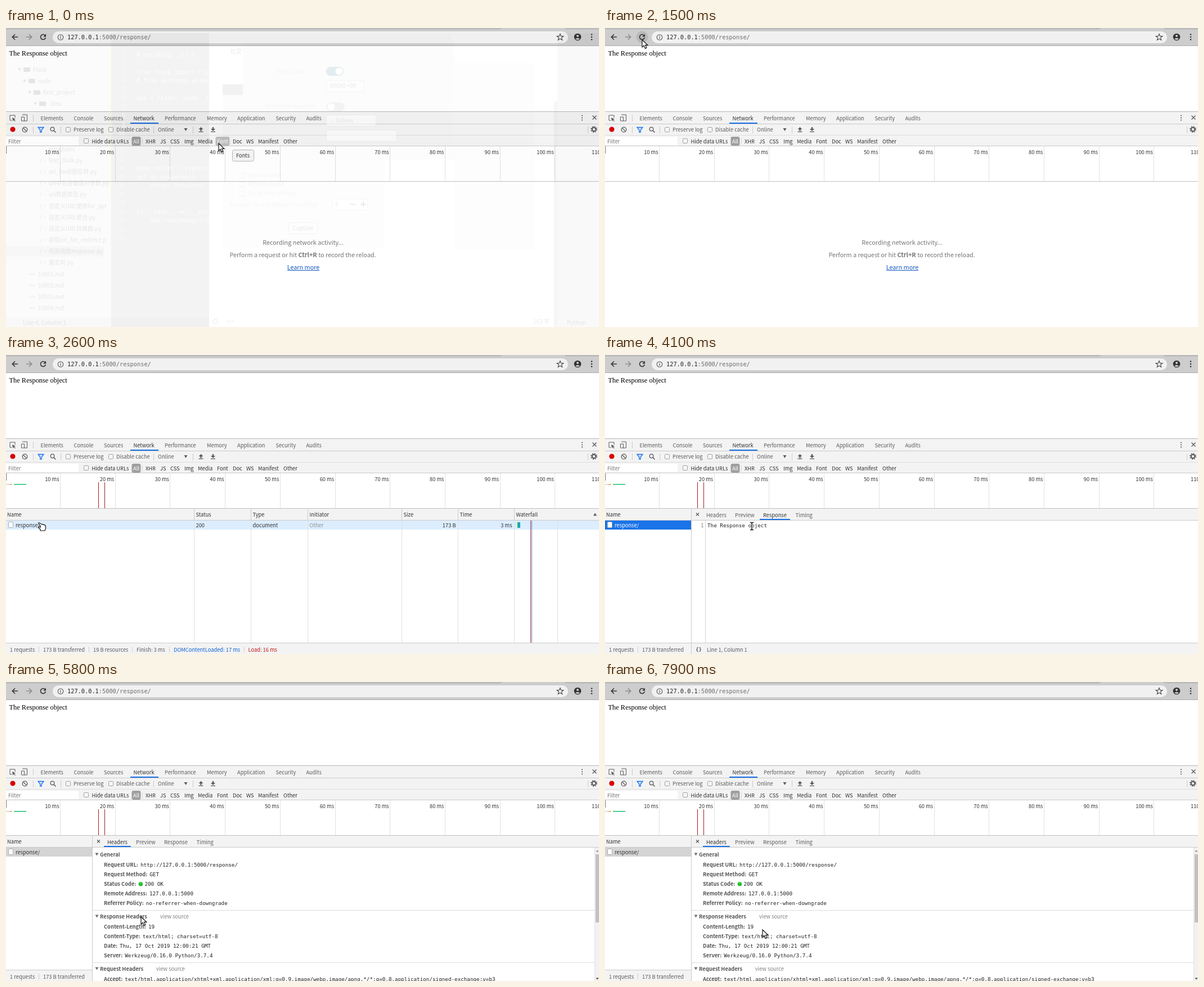
Animation, 1054 px wide and 531 px high, one loop 8 s. Source, as an HTML page with a canvas:

```html
<!DOCTYPE html>
<html lang="en">
<head>
<meta charset="utf-8">
<title>Inspecting a response</title>
<style>
html, body { margin: 0; width: 100%; height: 100%; overflow: hidden; background: #fff; }
canvas { display: block; }
</style>
</head>
<body>
<canvas id="stage" width="1054" height="531"></canvas>
<script>
const ctx = document.getElementById('stage').getContext('2d');
const W = 1054, H = 531, LOOP = 8000, STEP = 100;
const SANS = '"Noto Sans CJK SC", "Noto Sans CJK JP", "Noto Sans CJK", "Open Sans", sans-serif';
const MONO = '"DejaVu Sans Mono", monospace';
const UI = `9.3px ${SANS}`, BOLD = `bold 9.3px ${SANS}`, CODE = `9.27px ${MONO}`;
const GREY = '#5a5a5a', DARK = '#303030', BAR = '#f3f3f3', EDGE = '#cacaca', BLUE = '#1a73e8';

// Draws text on its baseline and returns the x where it ends.
function text(s, x, y, color = DARK, font = UI, align = 'left') {
  ctx.font = font;
  ctx.fillStyle = color;
  ctx.textAlign = align;
  ctx.fillText(s, x, y);
  return x + ctx.measureText(s).width;
}
function rect(x, y, w, h, color) {
  ctx.fillStyle = color;
  ctx.fillRect(x, y, w, h);
}
function round(x, y, w, h, r, fill, stroke) {
  ctx.beginPath();
  ctx.roundRect(x, y, w, h, r);
  paint(fill, stroke);
}
function circle(x, y, r, fill, stroke, width) {
  ctx.beginPath();
  ctx.arc(x, y, r, 0, 7);
  paint(fill, stroke, width);
}
function paint(fill, stroke, width = 1) {
  if (fill) { ctx.fillStyle = fill; ctx.fill(); }
  if (stroke) { ctx.strokeStyle = stroke; ctx.lineWidth = width; ctx.stroke(); }
}
// Paints an SVG path moved to x, y.
function shape(d, x, y, fill, stroke, width = 1) {
  const path = new Path2D(d);
  ctx.save();
  ctx.translate(x, y);
  if (fill) { ctx.fillStyle = fill; ctx.fill(path); }
  if (stroke) { ctx.strokeStyle = stroke; ctx.lineWidth = width; ctx.stroke(path); }
  ctx.restore();
}
const hline = (x, y, w, color = EDGE) => rect(x, y, w, 1, color);
const vline = (x, y, h, color = EDGE) => rect(x, y, 1, h, color);
const triangle = (x, y, color = GREY) => shape('M-3-2.5H3L0 2.5Z', x, y, color);
const checkbox = (x, y) => round(x + .5, y + .5, 8, 8, 1, '#f6f6f6', '#a0a0a0');

function browserBar(hoverReload) {
  rect(0, 0, W, 31, '#cdcdcd');
  shape('M0 1.5H876Q880 1.5 881 0M993 0Q994 1.5 998 1.5H1054', 0, 0, null, '#a2a2a2');
  hline(0, 31, W, '#ababab');
  if (hoverReload) circle(66, 16, 10.5, '#b9b9b9');
  const arrow = 'M5 0H-4.5M0-4.7L-4.7 0L0 4.7';
  shape(arrow, 16, 16, null, '#333', 1.6);
  ctx.save();
  ctx.translate(41, 16);
  ctx.scale(-1, 1);
  shape(arrow, 0, 0, null, '#8c8c8c', 1.6);
  ctx.restore();
  shape('M3.2-3.2A4.5 4.5 0 1 0 4.4 1', 66, 16, null, '#333', 1.6);
  shape('M5-5.5V-.6H.2Z', 66, 16, '#333');
  round(83, 6, 916, 21, 10.5, '#f1f1f1');
  circle(97, 16.5, 4.8, null, '#555', 1.1);
  rect(96.4, 15.5, 1.2, 3.6, '#555');
  rect(96.4, 13.5, 1.2, 1.2, '#555');
  const end = text('127.0.0.1', 109, 20, '#222', `10.3px ${MONO}`);
  text(':5000/response/', end, 20, '#6c6c6c', `10.3px ${MONO}`);
  shape('M0-6L1.6-2H5.8L2.5.8 3.7 5 0 2.6-3.7 5-2.5.8-5.8-2H-1.6Z', 985, 16.5, null, '#444', 1.1);
  circle(1016, 16, 6.3, '#333');
  circle(1016, 14, 2, '#cdcdcd');
  shape('M-4 3.2Q0 .2 4 3.2Q0 7 -4 3.2Z', 1016, 16, '#cdcdcd');
  for (const y of [11.5, 16, 20.5]) circle(1041, y, 1.3, '#333');
  text('The Response object', 5.5, 49, '#000', '12.4px "Liberation Serif", serif');
}

const FILTERS = [['XHR', 248], ['JS', 274], ['CSS', 292], ['Img', 317], ['Media', 341], ['Font', 375],
  ['Doc', 403], ['WS', 427], ['Manifest', 448], ['Other', 493]];

function chip(label, x, color) {
  ctx.font = UI;
  round(x - 2.5, 193, ctx.measureText(label).width + 5, 16, 3, color);
  text(label, x, 205, '#fff');
}

function devtoolsBars(hovered) {
  rect(0, 149, W, 61, BAR);
  for (const [y, color] of [[148, '#b8b8b8'], [170, EDGE], [190, '#dedede'], [209, EDGE]]) hline(0, y, W, color);

  // Panel tabs
  shape('M4 4.5H.5V-4.5H9.5V0', 6.5, 159.5, null, GREY);
  shape('M4-1L10 2 7.5 2.7 10 5.2 9 6 6.6 3.6 5.5 6Z', 7, 160, GREY);
  shape('M2-5.5H10.5V5.5H5M.5-1.5H5.5V5.5H.5Z', 27, 159.5, null, GREY);
  vline(48, 154, 12);
  [['Elements', 61.5], ['Console', 120.5], ['Sources', 174], ['Network', 226.5], ['Performance', 282],
    ['Memory', 357], ['Application', 411], ['Security', 479.5], ['Audits', 533.5]]
    .forEach(([label, x]) => text(label, x, 163.5, label === 'Network' ? DARK : GREY));
  rect(221, 168, 50, 2, BLUE);
  for (const y of [155.5, 159.5, 163.5]) circle(1024, y, 1.1, GREY);
  shape('M-3.5-3.5L3.5 3.5M3.5-3.5L-3.5 3.5', 1046, 159, null, GREY, 1.4);

  // Network controls
  circle(12, 180, 4.6, '#d80000');
  circle(33.5, 180.5, 4.3, null, GREY, 1.3);
  shape('M-3-3L3 3', 33.5, 180.5, null, GREY, 1.3);
  shape('M-5-4H5L1.2.8V4.5H-1.2V.8Z', 62, 180.5, '#d5e5fb', BLUE, 1.3);
  circle(82.5, 179.5, 3.3, null, GREY, 1.3);
  shape('M2.5 2.5L6 6', 82.5, 179.5, null, GREY, 1.5);
  for (const x of [48, 97, 262, 332, 1034]) vline(x, 175, 12);
  checkbox(106, 176);
  text('Preserve log', 120, 184, GREY);
  checkbox(182, 176);
  text('Disable cache', 196, 184, GREY);
  text('Online', 270, 184, GREY);
  triangle(319.5, 180.5);
  shape('M0-4L4 0H1.2V3H-1.2V0H-4ZM-4 3.8H4V5H-4Z', 346.5, 180, GREY);
  shape('M0 3L4-1H1.2V-4H-1.2V-1H-4ZM-4 3.8H4V5H-4Z', 368, 180, GREY);
  circle(1045, 180, 3.2, null, GREY, 2);
  ctx.setLineDash([2, 1.93]);
  circle(1045, 180, 5, null, GREY, 1.8);
  ctx.setLineDash([]);

  // Filter row
  rect(0, 193, 129, 15, '#fff');
  text('Filter', 4, 204.5, '#757575');
  checkbox(138, 196);
  text('Hide data URLs', 152.5, 204.5);
  chip('All', 226, '#9f9f9f');
  vline(242, 196, 11, '#d8d8d8');
  for (const [label, x] of FILTERS) {
    if (label === hovered) chip(label, x, '#bcbcbc');
    else text(label, x, 205);
  }
}

function timeline(loaded) {
  for (let i = 0; i < 11; i++) {
    const x = 96 + 97.7 * i;
    vline(Math.round(x), 210, 62, '#e1e1e1');
    text(`${i + 1}0 ms`, x - 1.5, 224, DARK, UI, 'right');
  }
  vline(0, 210, 13, '#777');
  hline(0, 272, W, '#c0c0c0');
  if (!loaded) return;
  rect(0, 229, 6, 1.5, '#c9d8c9');
  rect(6, 229, 5, 1.5, '#d9a45c');
  rect(14, 229, 22, 1.5, '#16bd74');
  vline(164, 226, 46, '#b31212');
  vline(175, 226, 46, '#a02020');
}

function emptyPanel() {
  const big = `10.85px ${SANS}`, color = '#757575';
  text('Recording network activity...', 528, 385, color, big, 'center');
  let x = text('Perform a request or hit ', 397.5, 407, color, big);
  x = text('Ctrl+R', x, 407, color, `bold ${big}`);
  text(' to record the reload.', x, 407, color, big);
  text('Learn more', 528.5, 428.5, '#1558c0', big, 'center');
  hline(500, 430, 57, '#1558c0');
}

function statusBar(items, width) {
  rect(0, 512, width, 19, BAR);
  hline(0, 511, width);
  items.forEach(([label, x, color = GREY], i) => {
    if (i) vline(Math.round(x - 8), 518, 10, '#d0d0d0');
    text(label, x, 526.5, color);
  });
}
const REQUESTS = [['1 requests', 7], ['173 B transferred', 66]];

function fileRow(color) {
  round(4.5, 296.5, 8, 10, 1, '#fff', '#aaa');
  text('response/', 17, 305.5, color);
}

function requestTable() {
  rect(0, 273, W, 20, BAR);
  rect(0, 294, W, 16, '#dcedfe');
  hline(0, 293, W);
  const columns = [['Name', 0], ['Status', 334], ['Type', 435], ['Initiator', 536], ['Size', 703],
    ['Time', 803], ['Waterfall', 903]];
  for (const [label, x] of columns) {
    if (x) { vline(x, 273, 21); vline(x, 294, 217, '#e0e0e0'); }
    text(label, x + (x ? 3.5 : 2), 287);
  }
  shape('M-3 2.5H3L0-2.5Z', 1047, 283, GREY);
  fileRow(DARK);
  text('200', 337.5, 305.5);
  text('document', 438.5, 305.5);
  text('Other', 539.5, 305.5, '#909090');
  text('173 B', 799.5, 305.5, DARK, UI, 'right');
  text('3 ms', 899.5, 305.5, DARK, UI, 'right');
  rect(909, 297, 2, 10, '#20c040');
  rect(911, 297, 3, 10, '#1d9ee0');
  vline(980, 294, 217, '#e0e0e0');
  vline(932, 294, 217, '#c03030');
  vline(934, 294, 217, '#4a90d9');
  statusBar([...REQUESTS, ['19 B resources', 155], ['Finish: 3 ms', 232],
    ['DOMContentLoaded: 17 ms', 298, '#0d62d0'], ['Load: 16 ms', 430.5, '#c01515']], W);
}

function detailFrame(active, hovered) {
  rect(0, 273, W, 20, BAR);
  hline(0, 293, W);
  text('Name', 2, 287);
  const selected = active === 'Response';
  rect(0, 294, 153, 16, selected ? BLUE : '#d4d4d4');
  fileRow(selected ? '#fff' : DARK);
  statusBar(REQUESTS, 153);
  vline(153, 273, 258);
  shape('M-2.5-2.5L2.5 2.5M2.5-2.5L-2.5 2.5', 164.5, 283, null, GREY, 1.2);
  for (const [label, x] of [['Headers', 180], ['Preview', 231], ['Response', 281], ['Timing', 338.5]]) {
    const end = text(label, x, 287.5, label === active || label === hovered ? DARK : GREY);
    if (label === active) rect(x - 6, 291, end - x + 12, 2, BLUE);
  }
}

function responseTab(hoverHeaders) {
  detailFrame('Response', hoverHeaders && 'Headers');
  vline(178, 294, 217, '#d4d4d4');
  text('1', 175.5, 305.5, '#808080', CODE, 'right');
  text('The Response object', 182, 305.5, '#222', CODE);
  rect(154, 512, 900, 19, BAR);
  hline(154, 511, 900);
  text('{}', 161, 526, GREY, `bold ${CODE}`);
  text('Line 1, Column 1', 181, 526.5, GREY);
}

const SECTIONS = [
  { title: 'General', y: 306, rows: [['Request URL:', 'http://127.0.0.1:5000/response/'], ['Request Method:', 'GET'],
    ['Status Code:', '200 OK'], ['Remote Address:', '127.0.0.1:5000'], ['Referrer Policy:', 'no-referrer-when-downgrade']] },
  { title: 'Response Headers', y: 416, link: 274, rows: [['Content-Length:', '19'], ['Content-Type:', 'text/html; charset=utf-8'],
    ['Date:', 'Thu, 17 Oct 2019 12:00:21 GMT'], ['Server:', 'Werkzeug/0.16.0 Python/3.7.4']] },
  { title: 'Request Headers', y: 509, link: 267, rows: [['Accept:', 'text/html,application/xhtml+xml,application/xml;q=0.9,'
    + 'image/webp,image/apng,*/*;q=0.8,application/signed-exchange;v=b3']] },
];

function headersTab(hoverLink) {
  detailFrame('Headers');
  for (const { title, y, link, rows } of SECTIONS) {
    if (link) hline(154, y - 11, 892, '#dcdcdc');
    triangle(161.5, y, '#6e6e6e');
    text(title, 167, y + 3.5, '#545454', BOLD);
    if (link) text('view source', link, y + 3.5, hoverLink && link === 274 ? '#333' : '#808080');
    rows.forEach(([label, value], i) => {
      const base = y + 22 + 17.1 * i;
      let x = text(label, 174, base, '#545454', BOLD) + 4;
      if (label === 'Status Code:') {
        circle(x + 4, base - 3.5, 3.8, '#1fbf26');
        shape('M-2.4-1.3Q0-3.6 2.4-1.3', x + 4, base - 3.5, '#8be58e');
        x += 11;
      }
      text(value, x, base, '#222', CODE);
    });
  }
  rect(1047, 294, 7, 237, '#f1f1f1');
  vline(1046, 294, 237, '#e0e0e0');
  rect(1048, 306, 6, 121, '#c1c1c1');
  shape('M-2.5 1.5H2.5L0-1.5Z', 1051, 300, '#888');
  shape('M-2.5-1.5H2.5L0 1.5Z', 1051, 527, '#444');
}

// Faint remains of an editor and a settings dialog behind the page.
function ghost() {
  const ink = 'rgba(0,0,0,.085)', pale = 'rgba(255,255,255,.85)', soft = 'rgba(0,0,0,.035)';
  rect(0, 9, 187, 522, 'rgba(0,0,0,.014)');
  rect(187, 9, 174, 522, 'rgba(0,0,0,.048)');
  rect(187, 32, 2, 270, 'rgba(255,240,190,.35)');
  rect(980, 9, 74, 522, 'rgba(0,0,0,.022)');
  rect(361, 10, 430, 15, 'rgba(0,0,0,.012)');
  rect(0, 515, 361, 16, 'rgba(0,0,0,.012)');
  rect(0, 387, 174, 19, 'rgba(0,0,0,.016)');

  const small = `10px ${SANS}`;
  [['Flask', 48], ['code', 57], ['first_project', 66], ['.idea', 76]].forEach(([name, x], i) => {
    const y = 74 + 20.2 * i;
    triangle(x - 24, y, ink);
    round(x - 17, y - 4, 12, 8, 1, ink);
    text(name, x, y + 3.5, ink, small);
  });
  text('templates', 76, 219, ink, small);
  ['first_flask.py', 'uri_for视图反转.py', 'uri中包含键值对参数.py', 'uri数据类型.py', '自定义URL使用for_pyt', '自定义URL整合.py',
    '自定义URL转换器.py', '获取uri_for_redirect.p', '视图函数response.py', '重定向.py', '10001.md', '10002.md', '10003.md', '10004.md']
    .forEach((name, i) => {
      const x = i < 10 ? 76 : 57, y = 239 + 20.15 * i;
      text(i < 10 ? '/•' : '<>', x - 16, y, ink, small);
      text(name, x, y, ink, small);
    });
  text('Line 4, Column 1', 30, 527, ink, small);

  ctx.save();
  ctx.beginPath();
  ctx.rect(187, 32, 174, 490);
  ctx.clip();
  const mono = `10.2px ${MONO}`, row = n => 35 + 15.5 * n;
  for (let n = 1; n <= 22; n++) text(n, 212, row(n), 'rgba(255,255,255,.5)', mono, 'right');
  [[1, '# encoding: utf-8'], [3, 'from flask import Flask'], [4, '# from werkzeug.wrappers'], [6, 'app = Flask(__name__)'],
    [14, "@app.route('/response/')"], [15, 'def my_response():'], [16, '    return Response('],
    [19, "if __name__ == '__main__':"], [20, '    app.run(debug=True)']]
    .forEach(([n, line]) => text(line, 232, row(n), pale, mono));
  ctx.restore();

  text('比交', 399, 45, ink, small);
  rect(385, 100, 36, 19, 'rgba(0,0,0,.055)');
  rect(385, 119, 36, 115, 'rgba(0,0,0,.012)');
  rect(421, 25, 375, 209, 'rgba(0,0,0,.012)');
  rect(796, 62, 144, 332, 'rgba(0,0,0,.008)');
  rect(385, 234, 288, 156, 'rgba(0,0,0,.008)');
  rect(974, 130, 6, 401, soft);
  round(569, 69, 31, 16, 8, 'rgba(0,110,125,.10)');
  circle(592, 77, 6.5, '#fff');
  round(569, 132, 33, 16, 8, soft);
  circle(578, 140, 6.5, '#fff');
  for (const [y, w] of [[93, 67], [154, 88], [181, 125]]) round(569.5, y + .5, w, 20, 2, 'rgba(255,255,255,.5)', soft);
  text('Select area', 480, 80, soft, small);
  text('Record file saved in:', 460, 143, soft, small);
  text('⌂  Videos', 576, 168, ink, small);
  text('000x0 +00', 576, 106, ink, small);
  ['Show pointer', 'Record sound', 'Show new window'].forEach((label, i) => {
    const y = 257 + 16 * i;
    round(415.5, y + .5, 9, 9, 1, null, soft);
    text(label, 430, y + 8, soft, small);
  });
  text('Seconds to wait before recording:', 398, 317, soft, small);
  round(580.5, 303.5, 62, 20, 2, '#fff', soft);
  text('5', 585, 317, ink, small);
  shape('M0 0H10M18 0H28M23-5V5', 612, 313, null, 'rgba(0,0,0,.14)');
  round(502.5, 345.5, 51, 20, 2, null, soft);
  text('Capture', 528, 359, ink, small, 'center');
  circle(372, 521, 4, null, ink);
  text('</>', 391, 525, ink, small);
  text('163 字', 937, 525, ink, small);
  text('Python', 997, 527, ink, small);
}

function tooltip(label, x, y) {
  ctx.font = UI;
  round(x + .5, y + .5, ctx.measureText(label).width + 14, 20, 3, '#f2f2f2', '#b5b5b5');
  text(label, x + 7, y + 14, '#333');
}

// Pointer stops: time, x, y. Equal neighbours are pauses.
const PATH = [[0, 378, 205], [100, 311, 203], [300, 311, 203], [400, 173, 104], [500, 173, 104], [1400, 63, 21],
  [1500, 66, 21], [1700, 66, 21], [2300, 104, 85], [2600, 62, 300], [4000, 62, 300], [4100, 261, 304], [4900, 345, 306],
  [5000, 345, 306], [5300, 198, 284], [5700, 198, 284], [5800, 240, 417], [6000, 227, 430], [6200, 227, 430],
  [6800, 290, 416], [7800, 290, 416], [7900, 280, 440]];

function pointerAt(t) {
  const next = PATH.findIndex(stop => stop[0] > t);
  if (next < 0) return PATH.at(-1).slice(1);
  const [t0, x0, y0] = PATH[next - 1], [t1, x1, y1] = PATH[next];
  const u = (t - t0) / (t1 - t0), k = u * u * (3 - 2 * u);
  return [x0 + (x1 - x0) * k, y0 + (y1 - y0) * k];
}

const ARROW = 'M0 0V13L3.1 10.2 5.4 15.4 7.9 14.3 5.6 9.3H9.8Z';
const HAND = 'M-4-.5Q-5-2 -3.2-2.2L2 1V.8Q4 .2 5 1.6Q8 1.4 8.5 4V8L7 12H-1V9.5L-4.5 6Q-4.5 4.5 -3 4.8L-.8 6V3.5Z';
const BEAM = 'M-3-6.5H-1L0-5.5 1-6.5H3M0-5.5V5.5M-3 6.5H-1L0 5.5 1 6.5H3';

function pointer(x, y, kind) {
  if (kind === 'beam') {
    shape(BEAM, x, y, null, '#fff', 3);
    shape(BEAM, x, y, null, '#111', 1.4);
  } else {
    shape(kind === 'hand' ? HAND : ARROW, x, y, '#fff', '#111', 1.2);
  }
}

function draw(now) {
  const t = Math.floor(now % LOOP / STEP) * STEP;
  const between = (a, b) => t >= a && t < b;
  const [x, y] = pointerAt(t);
  const onLink = between(6700, 7900);

  rect(0, 0, W, H, '#fff');
  browserBar(Math.hypot(x - 66, y - 16) < 10);
  devtoolsBars(t < 100 ? 'Font' : t < 400 ? 'CSS' : '');
  timeline(t >= 1700);
  if (t < 1700) emptyPanel();
  else if (t < 4100) requestTable();
  else if (t < 5800) responseTab(t >= 5300);
  else headersTab(onLink);

  if (t < 1500) ghost();
  if (t < 100) tooltip('Fonts', 402, 216);
  else if (t < 400) tooltip('Stylesheets', 338, 214);
  pointer(x, y, between(2500, 4100) || onLink ? 'hand' : between(4100, 5100) ? 'beam' : 'arrow');
  requestAnimationFrame(() => draw(performance.now()));
}
draw(0);
</script>
</body>
</html>
```
